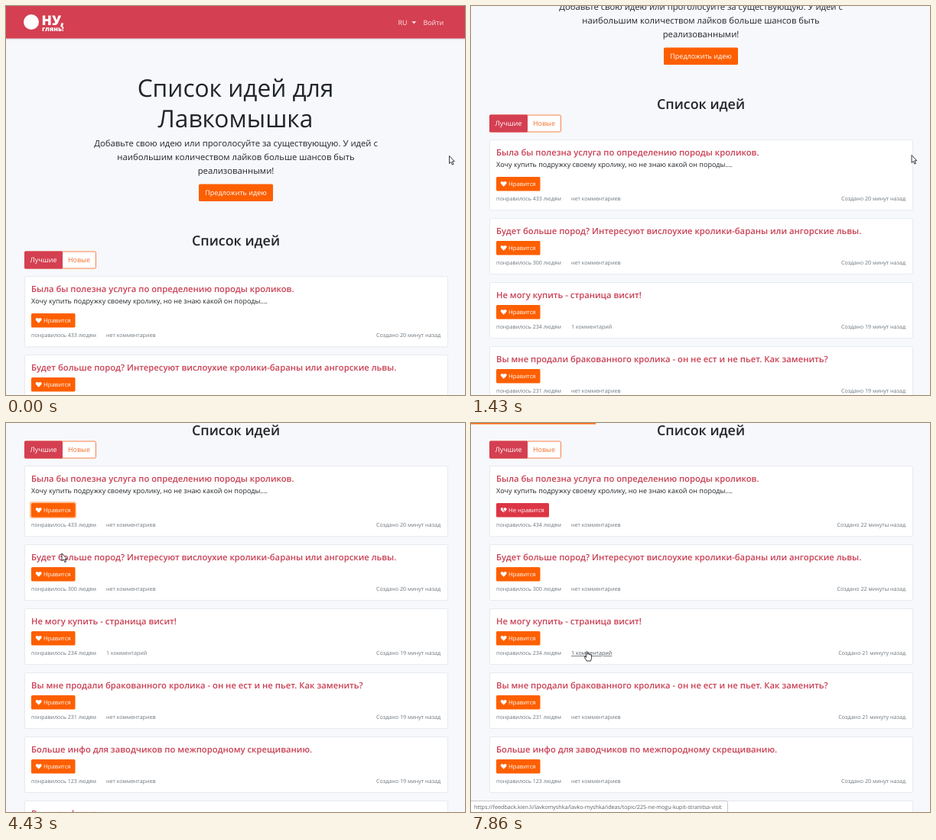
Animation of 600x510 px, one loop 8 s. Source, as an HTML page:

```html
<!DOCTYPE html>
<html lang="ru">
<head>
<meta charset="utf-8">
<title>Список идей</title>
<style>
  html, body { margin: 0; width: 100%; height: 100%; overflow: hidden; background: #f7f8fc; }
  svg { display: block; width: 600px; height: 510px; }
  text { font-family: 'Open Sans', 'Noto Sans', sans-serif; text-rendering: geometricPrecision; white-space: pre; }
</style>
</head>
<body>
<svg id="stage" viewBox="0 0 600 510"></svg>
<script>
const RED = '#d43f51', ORANGE = '#fd5f00', INK = '#212529', GREY = '#6c757d';
const LOOP = 8000, TICK = 1000 / 7;

const cards = [
  { title: 'Была бы полезна услуга по определению породы кроликов.', likes: 433, age: ['20 минут', '22 минуты'],
    note: 'Хочу купить подружку своему кролику, но не знаю какой он породы....' },
  { title: 'Будет больше пород? Интересуют вислоухие кролики-бараны или ангорские львы.', likes: 300, age: ['20 минут', '22 минуты'] },
  { title: 'Не могу купить - страница висит!', likes: 234, age: ['19 минут', '21 минуту'], comments: '1 комментарий' },
  { title: 'Вы мне продали бракованного кролика - он не ест и не пьет. Как заменить?', likes: 231, age: ['19 минут', '21 минуту'] },
  { title: 'Больше инфо для заводчиков по межпородному скрещиванию.', likes: 123, age: ['19 минут', '20 минут'] },
  { title: 'Введите фильтр', likes: 98, age: ['19 минут', '20 минут'] }
];

// Rows of [tick, ...values], linear in between
const scrollKeys = [[3, 0], [5, 60], [7, 119], [8, 119], [10, 179], [12, 179], [14, 238.5], [29, 238.5], [31, 298]];
const pointerKeys = [
  [0, 579.5, 196.5], [1, 577.5, 196], [2, 576, 195.5], [13, 576, 195.5], [14, 470, 207], [15, 322.5, 222],
  [17, 300, 224], [19, 260, 214], [20, 215, 190], [22, 110, 156], [24, 73, 171], [32, 73, 171],
  [35, 76, 262], [36, 78, 281], [37, 79, 292], [39, 122, 298], [41, 151.5, 299]
];

const rect = (x, y, w, h, fill, more = '') =>
  `<rect x="${x}" y="${y}" width="${w}" height="${h}" fill="${fill}" ${more}/>`;
const text = (x, y, size, fill, str, more = '') =>
  `<text x="${x}" y="${y}" font-size="${size}" fill="${fill}" ${more}>${str}</text>`;
const MID = 'text-anchor="middle"', END = 'text-anchor="end"';
const MEDIUM = 'font-weight="500"', SEMI = 'font-weight="600"', HEAVY = 'font-weight="800"';

const heart = (x, y) =>
  `<path transform="translate(${x} ${y})" fill="#fff" d="M0 3.5L-3.4 0C-5.1-2-2.3-4.7 0-2.3 2.3-4.7 5.1-2 3.4 0Z"/>`;

function card(c, i) {
  const top = i ? 373 + 84 * i : 354;
  const shift = c.note ? 19.3 : 0;
  const by = top + 30 + Math.floor(shift);
  const base = top + 61 + shift;
  return rect(24.5, top + .5, 553, 73 + shift, '#fff', 'rx="1.5" stroke="#e6eaef"') +
    text(33, top + 21, 11.26, '#c93f53', c.title, SEMI) +
    (c.note ? text(33, top + 36, 9, INK, c.note) : '') +
    rect(32, by - 1, 59, 20, 'none', `id="ring${i}" rx="2" stroke="#ffc39c" stroke-width="2" visibility="hidden"`) +
    rect(33, by, 57.5, 18.5, ORANGE, `id="btn${i}" rx="1.5"`) +
    heart(42.7, by + 9.2) +
    `<path id="crack${i}" transform="translate(42.7 ${by + 9.2})" d="M.4-3.6L-1-1 .9.5-.2 3.8" fill="none" stroke="#dc3545" visibility="hidden"/>` +
    text(49, by + 12, 7.75, '#fff', 'Нравится', `id="label${i}" ${MEDIUM}`) +
    text(33, base, 7.1, GREY, `понравилось ${c.likes} людям`, `id="likes${i}"`) +
    text(131, base, 7.1, GREY, c.comments || 'нет комментариев', `id="comments${i}"`) +
    text(568, base, 7.15, GREY, '', `id="age${i}" ${END}`);
}

const header =
  rect(0, 42, 600, 3, 'url(#shade)') + rect(0, 0, 600, 42.5, RED) +
  '<circle cx="33" cy="21" r="10" fill="#fff"/>' +
  text(46.5, 25, 17.5, '#fff', 'НУ,', HEAVY) +
  text(47, 33.2, 8.6, '#fff', 'глянь!', HEAVY) +
  text(512.5, 25, 8.9, '#fdeef0', 'RU', MEDIUM) +
  '<path d="M530.3 20.3h6l-3 3z" fill="#fdeef0"/>' +
  text(545.5, 25, 8.9, '#fdeef0', 'Войти', MEDIUM);

const intro =
  text(300, 119, 31.7, INK, 'Список идей для', MID) +
  text(300, 159.2, 31.7, INK, 'Лавкомышка', MID) +
  ['Добавьте свою идею или проголосуйте за существующую. У идей с',
   'наибольшим количеством лайков больше шансов быть',
   'реализованными!'].map((s, i) => text(300.5, 184.2 + 18 * i, 11.3, INK, s, MID)).join('') +
  rect(252, 233.5, 97, 22.5, ORANGE, 'rx="1.5"') +
  text(300.5, 248.3, 9.05, '#fff', 'Предложить идею', MID + ' ' + MEDIUM) +
  text(300.5, 313.7, 17.9, INK, 'Список идей', MID + ' ' + SEMI) +
  rect(24.5, 322, 93, 22, '#fff', `rx="1.5" stroke="#f5804a"`) +
  rect(24, 321.5, 50, 23, RED, 'rx="1.5"') +
  text(49, 336.4, 8.95, '#fff', 'Лучшие', MID + ' ' + MEDIUM) +
  text(95.5, 336.4, 8.95, '#f2702f', 'Новые', MID);

const address = 'https://feedback.kien.li/lavkomyshka/lavko-myshka/ideas/topic/225-ne-mogu-kupit-stranitsa-visit';

stage.innerHTML =
  `<defs><linearGradient id="shade" x2="0" y2="1">
    <stop stop-color="#cfccd3"/><stop offset="1" stop-color="#f7f8fc"/></linearGradient></defs>` +
  rect(0, 0, 600, 510, '#f7f8fc') +
  `<g id="page">${header}${intro}${cards.map(card).join('')}</g>` +
  rect(0, 0, 0, 1.6, '#fd6a10', 'id="progress"') +
  `<g id="status">${rect(-2, 495.5, 337.5, 17, '#fff', 'rx="2" stroke="#c6c8cb"')}${text(4, 505.6, 7.2, '#5a5d61', address)}</g>` +
  `<g id="pointer" stroke-linejoin="round" fill="#fff" stroke="#25252b" stroke-width=".9">
    <path id="arrow" d="M0 0V10L2.3 7.9 3.9 11.6 5.5 10.9 3.9 7.3H6.8Z"/>
    <path id="hand" d="M-.9 1Q0-.6.9 1V4.4Q2-.0 2.8 4.6 4 3.5 4.4 5 5.9 4.2 6.1 6V9.3L5 13H-.3L-2.9 8.8Q-3.8 7-2.4 7L-.9 8.4Z"/>
  </g>`;

const el = id => document.getElementById(id);
const show = (id, on) => el(id).setAttribute('visibility', on ? 'visible' : 'hidden');

function sample(keys, tick) {
  const next = keys.findIndex(k => k[0] > tick);
  if (next < 0) return keys[keys.length - 1].slice(1);
  const a = keys[next - 1] || keys[next], b = keys[next];
  const p = b === a ? 0 : (tick - a[0]) / (b[0] - a[0]);
  return a.slice(1).map((v, i) => v + (b[i + 1] - v) * p);
}

let last = -1;
function draw(tick) {
  const within = (from, to) => tick >= from && tick < to;
  const reloaded = tick >= 45, linked = tick >= 40;

  el('page').setAttribute('transform', `translate(0 ${-sample(scrollKeys, tick)[0]})`);
  el('pointer').setAttribute('transform', `translate(${sample(pointerKeys, tick)})`);
  const hand = within(24, 31) || tick === 36 || linked;
  show('hand', hand);
  show('arrow', !hand);

  cards.forEach((c, i) => el('age' + i).textContent = `Создано ${c.age[+reloaded]} назад`);
  el('btn0').setAttribute('fill', reloaded ? '#dc3545' : within(27, 30) ? '#cb4e06' : within(24, 31) ? '#d95100' : ORANGE);
  el('btn0').setAttribute('width', reloaded ? 69 : 57.5);
  el('btn2').setAttribute('fill', within(36, 38) ? '#dc5304' : ORANGE);
  el('label0').textContent = reloaded ? 'Не нравится' : 'Нравится';
  el('likes0').textContent = `понравилось ${reloaded ? 434 : 433} людям`;
  show('ring0', within(27, 42));
  show('crack0', reloaded);

  el('comments2').setAttribute('text-decoration', linked ? 'underline' : 'none');
  el('comments2').setAttribute('fill', linked ? '#495057' : GREY);
  show('status', linked);
  el('progress').setAttribute('width', Math.max(0, 163 - 19 * (55 - tick)));
}

function frame() {
  const tick = Math.min(55, Math.floor((performance.now() % LOOP + 4) / TICK));
  if (tick !== last) draw(last = tick);
  requestAnimationFrame(frame);
}
frame();
</script>
</body>
</html>
```
